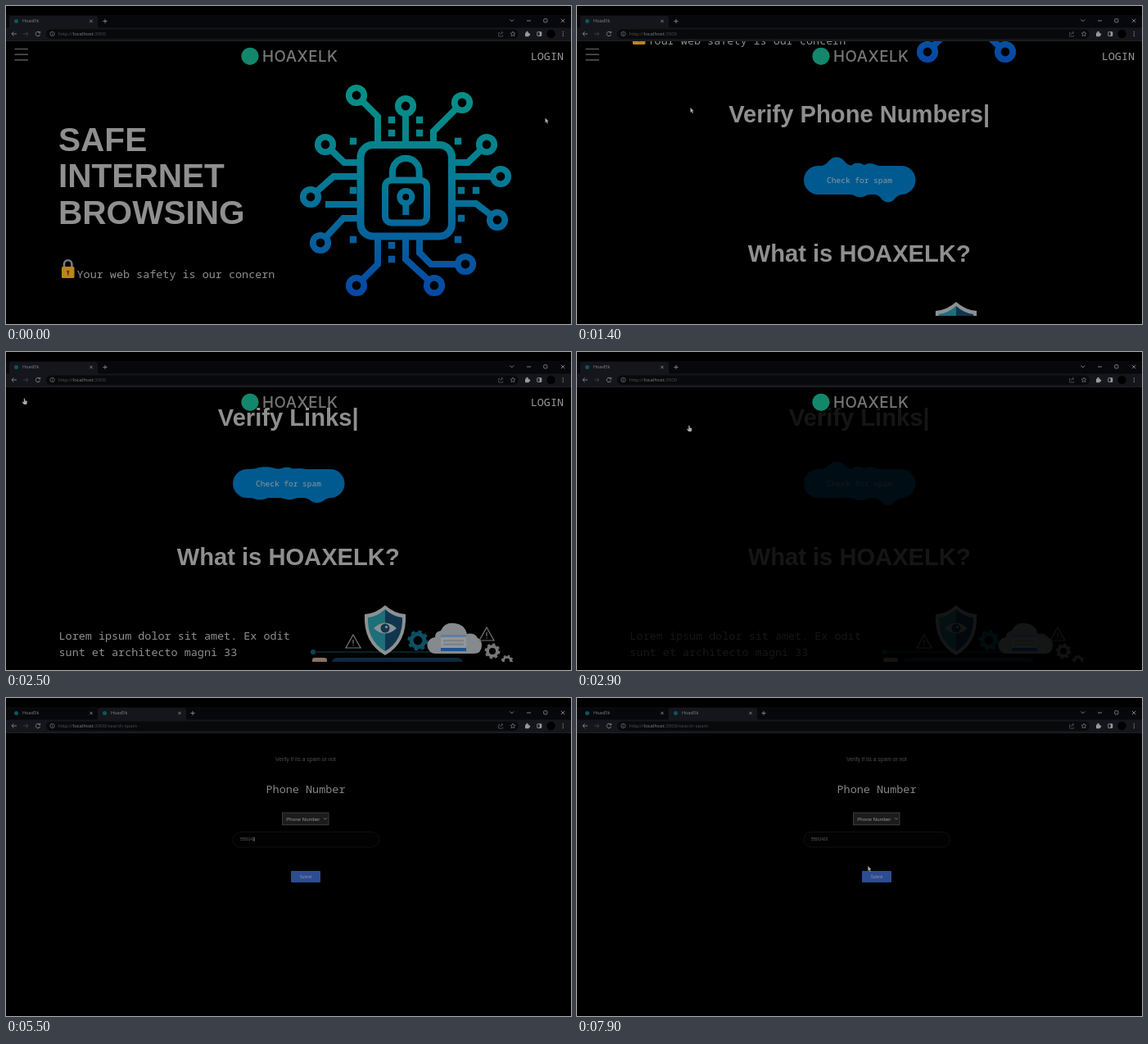
Write an HTML page that moves like this. It is 690 px wide and 388 px high and loops after 8000 ms.

```html
<!DOCTYPE html>
<html lang="en">
<head>
<meta charset="utf-8">
<title>Web safety demo</title>
<style>
  html, body { margin: 0; width: 100%; height: 100%; overflow: hidden; background: #000; }
  svg { display: block; width: 100vw; height: 100vh; }
  text { white-space: pre; }
  .mono { font-family: "Noto Sans Mono", monospace; }
  .bold { font-family: "Liberation Sans", Arial, sans-serif; font-weight: 700; }
  .sans { font-family: "Liberation Sans", Arial, sans-serif; }
  .ui { font-family: "Open Sans", sans-serif; }
  .brand { font-family: Inter, sans-serif; font-weight: 500; letter-spacing: .5px; }
  .line { fill: none; }
</style>
</head>
<body>
<svg id="stage" viewBox="0 0 690 388"></svg>
<script>
const LOOP = 8000, NEW_TAB = 3200, MENU = 2600;
const NAME = 'HoaxElk', NUMBER = '55501423';
const BLUE = '#015a8f', PALE = '#8f8f8f';

// Markup helpers
const text = (cls, x, y, size, fill, str, anchor = 'start', id = '') =>
  `<text class="${cls}" ${id && `id="${id}"`} x="${x}" y="${y}" font-size="${size}" fill="${fill}" text-anchor="${anchor}">${str}</text>`;
const rect = (x, y, w, h, fill, rx = 0, extra = '') =>
  `<rect x="${x}" y="${y}" width="${w}" height="${h}" fill="${fill}" rx="${rx}" ${extra}/>`;
const dot = (x, y, r, fill, extra = '') => `<circle cx="${x}" cy="${y}" r="${r}" fill="${fill}" ${extra}/>`;
const line = (d, stroke, width = 1) => `<path class="line" d="${d}" stroke="${stroke}" stroke-width="${width}"/>`;
const shape = (d, fill) => `<path d="${d}" fill="${fill}"/>`;
const group = (id, body, extra = '') => `<g id="${id}" ${extra}>${body}</g>`;
const heading = (y, str, id) => text('bold', 344.7, y, 29.15, PALE, str, 'middle', id);
const cross = (x, y, r) => line(`M${x - r} ${y - r}l${2 * r} ${2 * r}m0 ${-2 * r}l${-2 * r} ${2 * r}`, '#85878a', .9);
const plus = x => line(`M${x - 2.6} 18.5h5.2m-2.6 -2.6v5.2`, '#85878a', .9);

function tab(x, active) {
  const back = active ? shape(`M${x - 3} 27q3 0 3 -3v-9q0 -3 3 -3h102q3 0 3 3v9q0 3 3 3z`, '#14161b') : '';
  return back + dot(x + 8.5, 18.5, 2.5, '#0d5561') +
    text('ui', x + 16, 20.4, 5.4, '#85878a', NAME) + cross(x + 100, 18.5, 1.7);
}

function chrome() {
  const grey = '#7c7e82';
  return rect(0, 11, 690, 16, '#07080b') +
    group('oneTab', tab(4, true) + plus(121)) +
    group('twoTabs', tab(4, false) + tab(112, true) + plus(228)) +
    rect(0, 26.5, 690, 15.5, '#14161b') + rect(49, 28.5, 577, 11.5, '#08090b', 5.7) +
    rect(0, 42, 690, .9, '#222428') +
    line('M615.5 16.5l2.3 2.3 2.3 -2.3M636 18h5M13 34h-6m2.5 -2.6l-2.6 2.6 2.6 2.6', grey) +
    line('M21 34h6m-2.5 -2.6l2.6 2.6 -2.6 2.6', '#3a3c40') +
    rect(656.7, 15.7, 4.2, 4.2, 'none', .8, `stroke="${grey}" stroke-width=".9"`) + cross(680, 18, 2.2) +
    line('M41 32.2a2.7 2.7 0 1 0 .6 2.6M41.7 30.9v2h-2', grey) +
    dot(56.5, 34, 2.7, 'none', `stroke="${grey}" stroke-width=".7"`) + line('M56.5 33.5v2M56.5 32.2v.6', grey, .7) +
    text('ui', 64, 36.2, 6, '#4b4d51',
      '<tspan fill="#55575b">http://</tspan><tspan fill="#85878a">localhost</tspan>:3000<tspan id="path">/search-spam</tspan>') +
    line('M603 32.5h-1.3v4.6h5v-1.6M603.5 35q.5 -2.6 3 -2.6m-1.4 -1.5l1.7 1.5 -1.7 1.5', '#5d5f63', .7) +
    line('M619 31l.9 2 2.1 .2 -1.6 1.4 .5 2.2 -1.9 -1.1 -1.9 1.1 .5 -2.2 -1.6 -1.4 2.1 -.2z', grey, .7) +
    rect(634, 32.4, 4.8, 4.8, '#999', .6) + dot(636.5, 32, 1.2, '#999') + dot(639, 34.7, 1.2, '#999') +
    rect(648.8, 31.7, 5, 4.8, 'none', .5, 'stroke="#999" stroke-width=".9"') + rect(651.6, 31.7, 2.4, 4.8, '#999') +
    dot(665.5, 34, 5.2, '#000') + [31.6, 34, 36.4].map(y => dot(680.3, y, .65, '#999')).join('');
}

function chip() {
  const nodes = [
    [428, 109, 'L454 135V166'], [488, 122, 'V166'], [557, 118, 'L522 153V166'],
    [390, 169, 'L413 191H431'], [587, 169, 'L564 191H547'], [372, 233, 'L400 208H431'],
    [604, 208, 'H547'], [600, 261, 'L574 241H547'], [384, 289, 'L412 259H431'],
    [428, 341, 'L454 315V284'], [523, 341, 'L488 309V284'], [561, 315, 'H519L505 301V284']
  ];
  const bits = [[424, 165], [471, 139], [471, 155], [505, 139], [505, 155], [552, 165], [424, 285], [552, 285],
    [424, 225], [556, 225], [574, 225], [556, 259], [471, 292], [471, 309]];
  const sea = 'url(#sea)';
  const wires = nodes.map(([x, y, d]) => `M${x} ${y}${d}`).join('') + 'M390 242H431';
  return `<mask id="open">${rect(0, 0, 690, 388, '#fff')}${nodes.map(n => dot(n[0], n[1], 5.4, '#000')).join('')}</mask>
    <g mask="url(#open)">${line(wires, sea, 8)}${nodes.map(n => dot(n[0], n[1], 13.1, sea)).join('')}</g>` +
    shape(bits.map(([x, y]) => `M${x - 4.2} ${y - 4.2}h8.4v8.4h-8.4z`).join(''), sea) +
    rect(433, 169.5, 111.5, 111.5, 'none', 15, `stroke="${sea}" stroke-width="9"`) +
    rect(463, 212.5, 51, 52, 'none', 8, `stroke="${sea}" stroke-width="8"`) +
    line('M472 210V202a16.3 16.3 0 0 1 32.6 0V210M488.3 239V255', sea, 8) +
    dot(488.3, 233, 7.5, 'none', `stroke="${sea}" stroke-width="7"`);
}

function gear(x, y, r, fill) {
  return dot(x, y, r * .66, 'none', `stroke="${fill}" stroke-width="${r * .42}"`) +
    dot(x, y, r * .9, 'none', `stroke="${fill}" stroke-width="${r * .3}" stroke-dasharray="${r * .353}"`);
}

function art() {
  const warn = (x, y) => line(`M${x} ${y - 8}l9 16h-18zM${x} ${y - 2}v5m0 1.2v1.4`, '#777', 1.2);
  const wire = '#0c4254', steel = '#8d9092';
  return line('M374 703H566M400 846H620M420 867H510L518 865H620M410 731H620', wire, 1.2) +
    dot(375, 703, 3, wire) + dot(620, 846, 2, wire) + dot(620, 867, 2, wire) +
    gear(377, 846, 13, '#0b3549') + gear(503, 689, 12, '#0d5064') +
    rect(374, 710, 18, 12, '#8a7160', 3) +
    rect(398, 710, 160, 145, '#0b2a3c', 6) + rect(406, 717, 144, 131, '#707a80') +
    rect(412, 723, 132, 119, '#89939a', 2) + rect(438, 760, 70, 74, '#7c2424', 3) +
    rect(450, 770, 46, 51, '#858585', 2) + rect(553, 788, 48, 49, '#9a650f', 3) +
    line('M594 832q8 6 12 -4', '#999', 2) +
    shape('M391 852H574V856Q572 859 566 859H399Q391 858 391 852z', '#8b9093') +
    shape('M463 646Q474 656 488 657Q490 692 463 707Q436 692 438 657Q452 656 463 646z', steel) +
    shape('M463 651Q453 660 442 661Q441 689 463 702z', '#1d6f78') +
    shape('M463 651Q473 660 484 661Q485 689 463 702z', '#10364f') +
    shape('M449 674Q463 661 477 674Q463 687 449 674z', steel) +
    dot(463, 674, 5.5, '#10364f') + dot(464.5, 672.5, 1.6, steel) +
    shape('M525 705a10 10 0 0 1 -1 -20q0 -7 7 -8q5 -11 17 -9q12 1 15 13q9 -2 13 5q5 2 5 9q0 10 -10 10z', '#868a8d') +
    rect(531, 682, 31, 20, '#5f7f9c', 1) + rect(531, 685, 31, 13, '#92979b') + rect(534, 688, 25, 2.4, '#7d8286') +
    rect(534, 692.5, 25, 2.4, '#7d8286') + rect(531, 698, 31, 4, '#1b5591') +
    gear(594, 702, 9, '#777') + gear(612, 714, 7, '#777') + warn(424, 690) + warn(587, 681);
}

const button = (id, y, label) => group(id, '') + rect(277, y, 136.5, 35, BLUE, 17.5) +
  text('mono', 345, y + 21, 9.5, '#8f979b', label, 'middle');

function page() {
  const lorem = ['Lorem ipsum dolor sit amet. Ex odit', 'sunt et architecto magni 33', 'voluptatem nulla aut quia dolores',
    'et vero omnis. Qui ipsa rerum sit', 'natus facere ut iusto velit est', 'autem minus. Sed enim quos non',
    'galisum dolore ea fugit nihil aut', 'eius modi in culpa saepe. Et amet', 'odit id exercitationem perspiciatis', 'qui eaque totam.'];
  const stats = [[195, 'SMS'], [345, 'Numbers'], [495, 'Links']];
  return ['SAFE', 'INTERNET', 'BROWSING'].map((w, i) => text('bold', 64, 177 + i * 44.4, 40.6, PALE, w)).join('') +
    line('M71 320v-5a4.7 4.7 0 0 1 9.4 0v5', '#777b7f', 2.6) + rect(68, 318, 15.5, 14, '#b88717', 1.6) +
    dot(75.7, 324, 1.6, '#4a3912') + rect(75, 324, 1.5, 4.5, '#4a3912') +
    text('mono', 86.5, 332, 13.45, PALE, 'Your web safety is our concern') + chip() +
    heading(427, '', 'verify') + button('goo1', 480, 'Check for spam') +
    heading(597, `What is ${NAME.toUpperCase()}?`) +
    lorem.map((s, i) => text('mono', 64.5, 687.5 + i * 20, 13.45, PALE, s)).join('') + art() +
    heading(945, '', 'found') + button('goo2', 998, 'REPORT TO US') +
    stats.map(([x, s], i) => text('mono', x, 1110, 36, PALE, '', 'middle', 'stat' + i) +
      text('mono', x, 1127, 10.3, '#5c5c5c', 'Tracked spam ' + s, 'middle')).join('');
}

const header = () => group('burger', line('M10.5 52.5h16.5m-16.5 6.7h16.5m-16.5 6.7h16.5', '#6a6a6a', 1.2)) +
  dot(298, 61.3, 10.6, '#13876c') + text('brand', 313, 68, 18.8, '#777', NAME.toUpperCase()) +
  text('mono', 640.7, 66.4, 13.45, '#999', 'LOGIN', 'start', 'login');

const form = () => text('sans', 366, 77, 6.75, '#4c4c4c', 'Verify if its a spam or not', 'middle') +
  text('mono', 366, 115.5, 13.47, '#858585', 'Phone Number', 'middle') +
  rect(337.5, 140, 56.5, 14.8, '#1c1c1c', 0, 'stroke="#484848" stroke-width=".8"') +
  text('sans', 342.3, 149.5, 6.1, '#939393', 'Phone Number') + line('M388 146.3l1.9 1.9 1.9 -1.9', '#858585', .8) +
  rect(277, 163.5, 178.5, 18.5, '#020202', 9.2, 'stroke="#151515" stroke-width=".8"') +
  text('sans', 286, 174.4, 4.5, '#686868', '', 'start', 'typed') + rect(285.4, 170, .8, 5, '#858585', 0, 'id="caret"') +
  rect(348, 211, 36, 14, '#2c4d92', .8) + text('sans', 366, 219.7, 4.7, '#8793ac', 'Submit', 'middle');

const stage = document.getElementById('stage');
stage.innerHTML = `<defs>
    <linearGradient id="sea" gradientUnits="userSpaceOnUse" x1="0" y1="96" x2="0" y2="354">
      <stop stop-color="#079184"/><stop offset=".45" stop-color="#077a94"/><stop offset="1" stop-color="#0647a4"/>
    </linearGradient>
    <clipPath id="view">${rect(0, 43, 690, 335, '#fff')}</clipPath>
  </defs>` + rect(0, 0, 690, 388, '#000') + chrome() +
  group('home', group('scroller', page()) + header(), 'clip-path="url(#view)"') + group('form', form()) +
  group('arrow', shape('M0 0v6l1.4 -1.3 1 2.2 1 -.5 -1 -2.1h1.8z', '#aaa')) +
  group('hand', shape('M-.7 0q.7 -.9 1.4 0v2.3l2 .5q.8 .3 .6 1.2l-.6 3h-3.4l-2 -2.7q0 -1 1 -.6l1 .7z', '#aaa'));
const $ = id => document.getElementById(id);

// Keyed values: [time, ...numbers], eased between keys
function track(keys, t) {
  let i = 0;
  while (i < keys.length - 2 && t >= keys[i + 1][0]) i++;
  const [a, b] = [keys[i], keys[i + 1]];
  let k = Math.min(1, Math.max(0, (t - a[0]) / (b[0] - a[0])));
  k = k * k * (3 - 2 * k);
  return a.slice(1).map((v, n) => v + (b[n + 1] - v) * k);
}
const SCROLL = [[950, 0], [1400, 285], [1700, 786], [2000, 786], [2450, 337]];
const MOUSE = [[0, 658.5, 136.5], [350, 480, 215], [600, 120, 250], [900, 12, 68], [1400, 138.5, 124],
  [1700, 137, 125], [2000, 137, 125], [2400, 22.5, 57], [2700, 22.5, 57], [3200, 345, 150]];
const LATE_MOUSE = [[5600, 358, 186], [6000, 364, 203], [6100, 364, 203], [6200, 355.3, 205]];
const KEYS = [[4000, 1], [4400, 3], [4700, 4], [5200, 5], [5500, 7], [7100, 8]];
const CARET_OFF = [[4900, 5200], [5900, 6200], [6500, 6800], [7400, 7700], [7900, 8000]];

const show = (id, on) => $(id).setAttribute('display', on ? 'inline' : 'none');
const put = (id, x, y) => $(id).setAttribute('transform', `translate(${x} ${y})`);
const type = (word, from, t) => word.slice(0, Math.max(0, Math.ceil((t - from) / 16)));

// Drips that swell from the top and bottom edges of a button
function goo(id, top, t) {
  const bump = (x, w, h) => `M${x - w} 0C${x - w / 2} 0 ${x - w / 2} ${-h} ${x} ${-h}S${x + w / 2} 0 ${x + w} 0V6H${x - w}z`;
  const wave = (floor, shift = 0) => floor + (1 - floor) * (.5 + .5 * Math.cos((t - 1400 + shift) / 700 * 2 * Math.PI));
  const edge = (d, y, flip) => `<path fill="${BLUE}" transform="translate(0 ${y}) scale(1 ${flip})" d="${d}"/>`;
  $(id).innerHTML =
    edge(bump(317, 20, 10.5 * wave(.22)) + bump(343, 12, 3.5 * wave(.6)) + bump(358, 12, 3 * wave(.3)), top, 1) +
    edge(bump(310, 13, 2.5 * wave(0, 350)) + bump(346, 13, 3.2 * wave(.6)) + bump(380, 17, 9.5 * wave(.6)), top + 35, -1);
}

function draw(t) {
  const home = t < NEW_TAB;
  show('home', home); show('oneTab', home); show('path', !home);
  show('form', !home); show('twoTabs', !home);
  if (home) {
    put('scroller', 0, -track(SCROLL, t)[0]);
    $('scroller').setAttribute('opacity', t < MENU ? 1 : .15);
    $('verify').textContent = (t < 1800 ? type('Verify Phone Numbers', 1000, t) : type('Verify Links', 2200, t)) + '|';
    $('found').textContent = type('Found Spam SMS', 1450, t) + '| ?';
    const k = Math.min(1, Math.max(0, (t - 1500) / 190));
    ['19+', '1', '80'].forEach((s, i) => {
      $('stat' + i).textContent = Math.round(parseInt(s) * k) + (i ? '' : '+');
    });
    goo('goo1', 480, t); goo('goo2', 998, t);
    show('burger', t < 2450); show('login', t < MENU);
  } else {
    const n = KEYS.reduce((c, [at, count]) => t >= at ? count : c, 0);
    $('typed').textContent = NUMBER.slice(0, n);
    $('caret').setAttribute('x', 285.2 + n * 2.5);
    show('caret', t >= 3700 && !CARET_OFF.some(([a, b]) => t >= a && t < b));
  }
  const pointing = t >= 2350 && home;
  show('hand', pointing);
  show('arrow', home ? !pointing : t >= 5600);
  put(pointing ? 'hand' : 'arrow', ...track(home ? MOUSE : LATE_MOUSE, t));
}

const start = performance.now();
function tick() {
  draw((performance.now() - start) % LOOP);
  requestAnimationFrame(tick);
}
tick();
</script>
</body>
</html>
```
